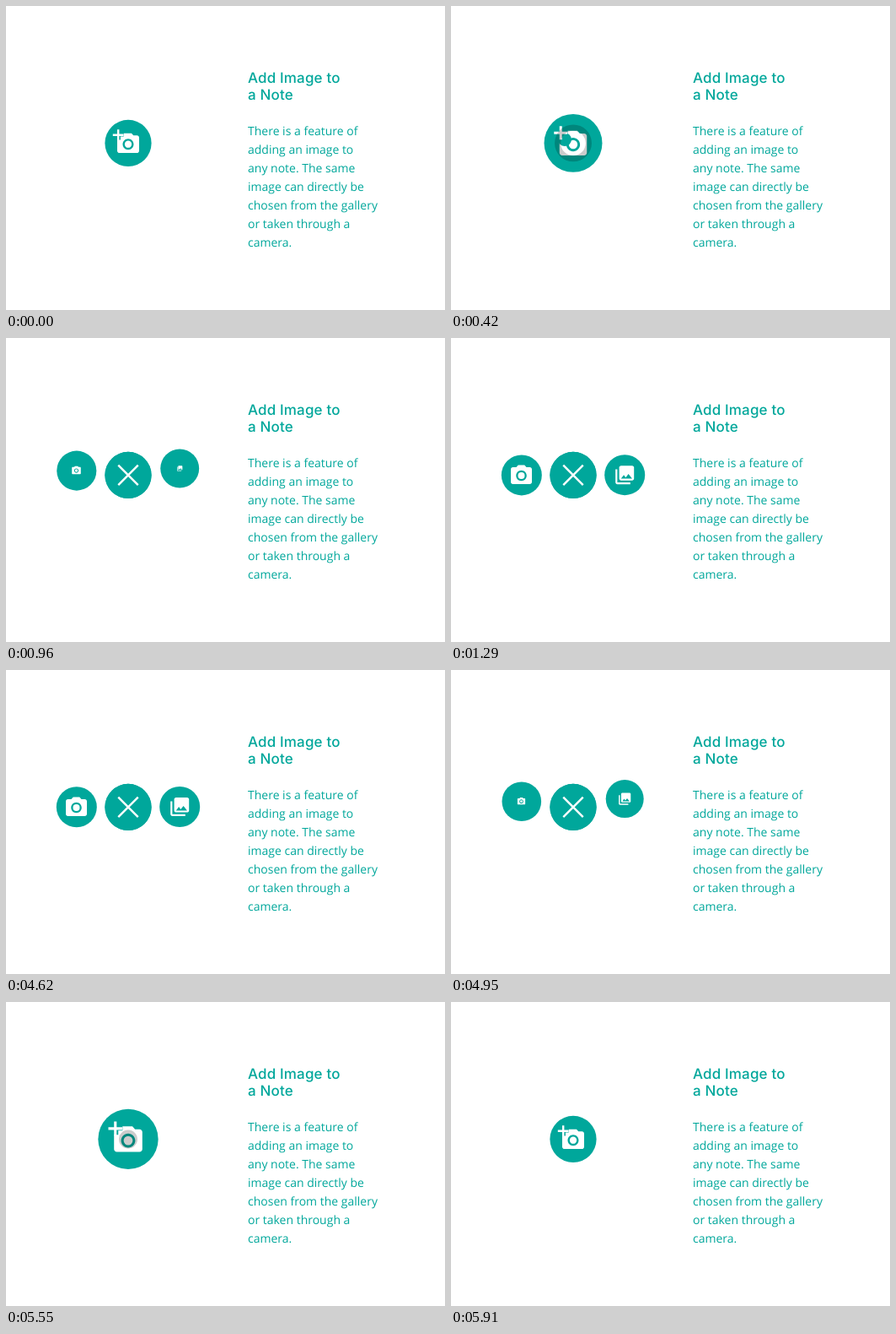
Recreate the animation shown at these times as an HTML page. Size 521 px wide and 360 px high, loop 6.27 s.

```html
<!DOCTYPE html>
<html lang="en">
<head>
<meta charset="utf-8">
<title>Add Image to a Note</title>
<style>
html, body { margin: 0; width: 100%; height: 100%; overflow: hidden; background: #fff; }
svg { display: block; width: 521px; height: 360px; }
text { text-rendering: geometricPrecision; }
.teal { fill: #00a79b; }
.white { fill: #fff; }
.title { font: 500 17px Inter, sans-serif; letter-spacing: .15px; }
.body { font: 14px "Open Sans", sans-serif; }
</style>
</head>
<body>
<svg viewBox="0 0 521 360" xmlns="http://www.w3.org/2000/svg">
  <defs><clipPath id="disc"><circle id="clip" cx="145" cy="162.4"/></clipPath></defs>
  <g class="teal title">
    <text x="287" y="91">Add Image to</text>
    <text x="287" y="111">a Note</text>
  </g>
  <g class="teal body" id="copy"></g>

  <circle class="teal" id="left"/>
  <circle class="teal" id="right"/>
  <g id="cameraIcon" class="white">
    <path d="M9 2L7.17 4H4c-1.1 0-2 .9-2 2v12c0 1.1.9 2 2 2h16c1.1 0 2-.9 2-2V6c0-1.1-.9-2-2-2h-3.17L15 2H9zm3 15c-2.76 0-5-2.24-5-5s2.24-5 5-5 5 2.24 5 5-2.24 5-5 5z"/>
    <circle cx="12" cy="12" r="3.2"/>
  </g>
  <g id="galleryIcon" class="white">
    <path d="M22 16V4c0-1.1-.9-2-2-2H8c-1.1 0-2 .9-2 2v12c0 1.1.9 2 2 2h12c1.1 0 2-.9 2-2zm-11-4l2.03 2.71L16 11l4 5H8l3-4zM2 6v14c0 1.1.9 2 2 2h14v-2H4V6H2z"/>
  </g>

  <circle class="teal" id="main" cx="145" cy="162.4"/>
  <g clip-path="url(#disc)">
    <g id="zoom">
      <g id="photo" class="white" transform="translate(128.1 145.5) scale(1.3)">
        <path d="M6 10V7h3V4h7l1.83 2H21c1.1 0 2 .9 2 2v12c0 1.1-.9 2-2 2H5c-1.1 0-2-.9-2-2V10h3zm7 9c2.76 0 5-2.24 5-5s-2.24-5-5-5-5 2.24-5 5 2.24 5 5 5z"/>
        <circle cx="13" cy="14" r="3.2"/>
      </g>
      <circle class="teal" id="wipe" cx="137" cy="159"/>
      <path id="plus" stroke="#fff" stroke-width="2.4" fill="none"/>
    </g>
    <path id="ripple" fill-opacity=".2" fill-rule="evenodd"/>
  </g>
</svg>
<script>
const LOOP = 6270, STEP = 30, MIRROR = 5880, CX = 145, CY = 162.4, REST = 27.6;
const $ = id => document.getElementById(id);
const set = (el, attrs) => { for (const k in attrs) $(el).setAttribute(k, attrs[k]); };
const ramp = (t, a, b) => Math.min(1, Math.max(0, (t - a) / (b - a)));
const mix = (a, b, p) => a + (b - a) * p;
const smooth = p => p * p * (3 - 2 * p);
const easeOut = (p, n) => 1 - (1 - p) ** n;
const backOut = p => 1 - 2.3 * (1 - p) ** 3 + 1.3 * (1 - p) ** 2;

const lines = ['There is a feature of', 'adding an image to', 'any note. The same',
  'image can directly be', 'chosen from the gallery', 'or taken through a', 'camera.'];
$('copy').innerHTML = lines.map((s, i) => `<text x="287" y="${153 + 22 * i}">${s}</text>`).join('');

// A side button swings out with overshoot, hops above the centre line and sinks back
function swing(u, side, born, level) {
  const z = Math.max(-25, u - level) / 100;
  return {
    cx: CX + side * 61.2 * backOut(ramp(u, level - 120, level + 180)),
    cy: CY + 0.4 - 22 * z * Math.exp(1 - z),
    r: 24 * easeOut(ramp(u, born, 1190), 3)
  };
}

function icon(id, x, y, scale, ox, oy) {
  set(id, {
    transform: `translate(${x} ${y}) scale(${scale}) translate(${-ox} ${-oy})`,
    visibility: scale > 0.01 ? 'visible' : 'hidden'
  });
}

const ring = r => r > 0 ? `M${CX - r} ${CY}a${r} ${r} 0 1 0 ${2 * r} 0a${r} ${r} 0 1 0 ${-2 * r} 0z` : '';

function draw(t) {
  const back = t > MIRROR / 2;
  const u = back ? Math.max(0, MIRROR - t) : t;

  const r = REST + 8.1 * Math.sin(Math.PI * ramp(u, 0, 620));
  set('main', { r });
  set('clip', { r });
  set('zoom', { transform: `translate(${CX} ${CY}) scale(${r / REST}) translate(${-CX} ${-CY})` });

  set('photo', { visibility: u < 570 ? 'visible' : 'hidden' });
  set('wipe', { r: 48 * ramp(u, 300, 570) ** 2.5 });

  const grow = easeOut(ramp(u, 440, 940), 2), turn = 45 * easeOut(ramp(u, 613, 910), 2);
  const arm = mix(6.4, 16.6, grow);
  set('plus', {
    d: `M${-arm} 0H${arm}M0 ${-arm}V${arm}`,
    transform: `translate(${mix(133.2, CX, grow)} ${mix(152.7, CY, easeOut(grow, 2))}) rotate(${turn})`
  });

  const outer = 36 * ramp(u, 240, 535), inner = 36 * ramp(u, 340, 535);
  set('ripple', { d: ring(outer) + ring(inner) });

  const left = swing(u, -1, 338, 595), right = swing(u, 1, 535, 650);
  // small dip before the side buttons fold in
  const dip = back ? 9 * Math.sin(Math.PI * ramp(t, 4620, 4860)) : 0;
  left.cy += dip;
  right.cy += dip;
  set('left', left);
  set('right', right);

  const ls = back ? 1 - smooth(ramp(t, 4650, 5160)) : smooth(ramp(t, 740, 1230));
  const rs = back ? 1 - smooth(ramp(t, 4700, 5320)) : smooth(ramp(t, 780, 1290));
  icon('cameraIcon', left.cx - 0.3, left.cy - 0.6, 1.25 * ls, 12, 11);
  icon('galleryIcon', right.cx, right.cy, 1.1 * rs, 12, 12);
}

const start = performance.now();
function tick() {
  const t = (performance.now() - start) % LOOP;
  draw(Math.floor(t / STEP) * STEP);
  requestAnimationFrame(tick);
}
tick();
</script>
</body>
</html>
```
